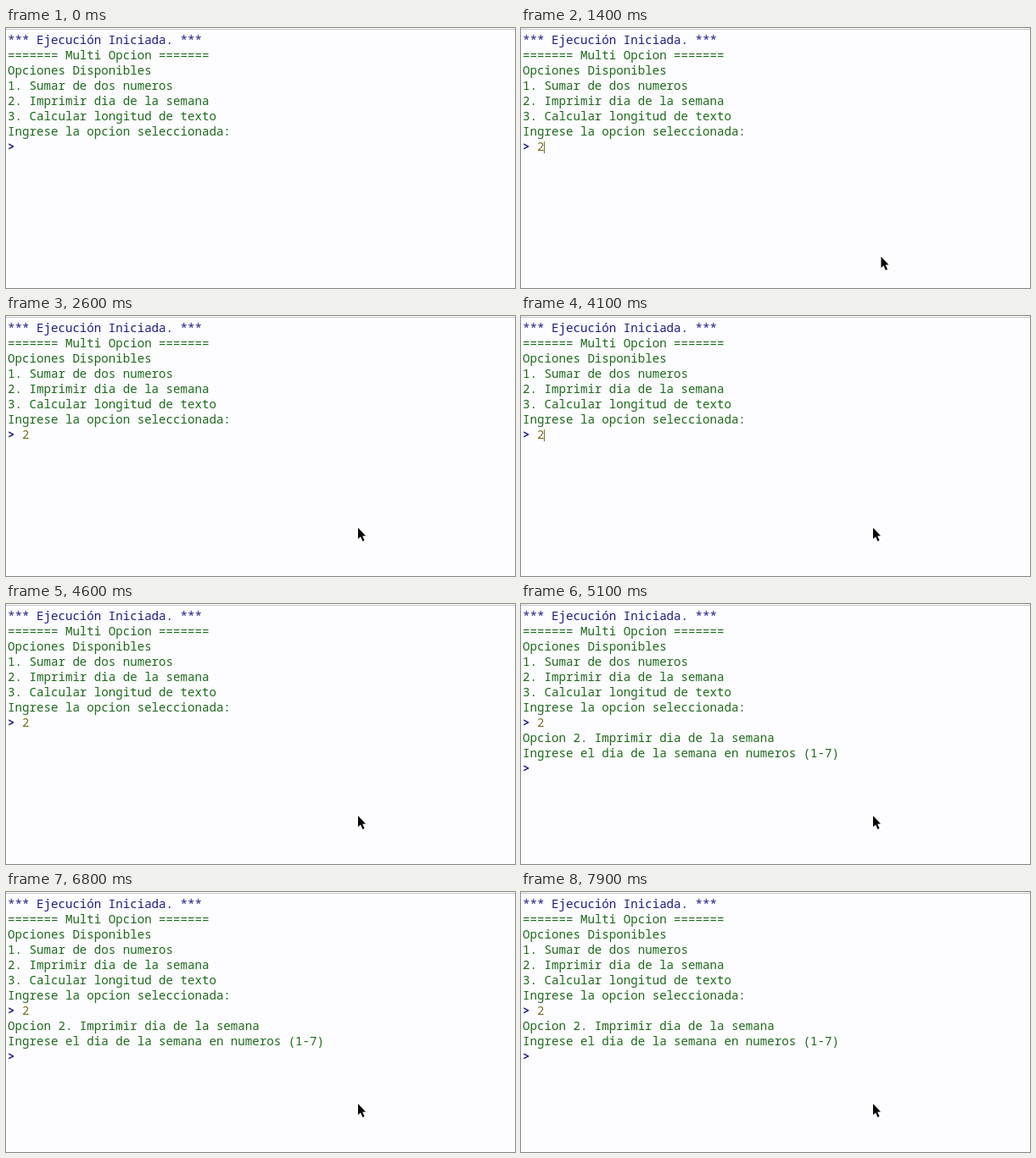
Recreate the animation shown at these times as an HTML page with a canvas. Size 600x307 px, loop 8 s.

```html
<!DOCTYPE html>
<html lang="es">
<head>
<meta charset="utf-8">
<title>Multi Opcion</title>
<style>
  html, body { margin: 0; width: 100%; height: 100%; overflow: hidden; background: #fdfcfe; }
  canvas { display: block; }
</style>
</head>
<body>
<canvas id="stage" width="600" height="307"></canvas>
<script>
const ctx = document.getElementById('stage').getContext('2d');
const LOOP = 8000, STEP = 100, BLINK = 500;
const LEFT = 2.1, CELL = 8.48, BASE = 19, LINE = 18;
const BLUE = '#1c1c86', GREEN = '#1c6a1a', OLIVE = '#74741c';
const FONT = CELL / 0.6 + 'px "Noto Sans Mono", "DejaVu Sans Mono", monospace';

// Moments of the session, in ms
const FOCUS = 400, TYPED = 1100, ENTERED = 4700, PROMPT = 5300;

const menu = [
  '======= Multi Opcion =======',
  'Opciones Disponibles',
  '1. Sumar de dos numeros',
  '2. Imprimir dia de la semana',
  '3. Calcular longitud de texto',
  'Ingrese la opcion seleccionada:'
];
const answer = [
  'Opcion 2. Imprimir dia de la semana',
  'Ingrese el dia de la semana en numeros (1-7)'
];

const pointer = { start: 1300, time: 300, from: [441, 305], to: [415, 250] };
const arrow = [[0, 0], [0, 13.2], [3, 10.5], [5.4, 16], [7.6, 15], [5.2, 9.7], [9, 9.5]];

function write(text, row, color, col = 0, weight = '') {
  ctx.font = weight + ' ' + FONT;
  ctx.fillStyle = color;
  ctx.fillText(text, LEFT + col * CELL, BASE + row * LINE);
}

function drawPrompt(row) {
  write('>', row, BLUE, 0, '600');
}

// The blink starts anew with each input
function drawCaret(t) {
  const begin = t >= ENTERED ? PROMPT : t >= TYPED ? TYPED : FOCUS;
  const since = t - begin;
  if (since < 0 || since % (2 * BLINK) >= BLINK) return;
  const row = t >= ENTERED ? 10 : 7;
  const col = begin === TYPED ? 3 : 2;
  ctx.fillStyle = begin === TYPED ? '#77773a' : '#55557a';
  ctx.fillRect(Math.round(LEFT + col * CELL - 0.2), row * LINE + 8, 1, 14);
}

function drawPointer(t) {
  if (t < pointer.start) return;
  const p = Math.min(1, (t - pointer.start) / pointer.time);
  const left = (1 - p) ** 2.5;
  const [x, y] = pointer.to.map((end, i) => end + (pointer.from[i] - end) * left);
  ctx.beginPath();
  for (const [dx, dy] of arrow) ctx.lineTo(x + dx, y + dy);
  ctx.closePath();
  ctx.lineJoin = 'round';
  ctx.lineWidth = 1.6;
  ctx.strokeStyle = '#fff';
  ctx.stroke();
  ctx.fillStyle = '#080808';
  ctx.fill();
}

function draw(t) {
  ctx.fillStyle = '#fdfcfe';
  ctx.fillRect(0, 0, 600, 307);
  ctx.fillStyle = '#c6c5c9';
  ctx.fillRect(0, 1, 600, 1);

  write('*** Ejecución Iniciada. ***', 0, BLUE);
  menu.forEach((text, i) => write(text, i + 1, GREEN));
  drawPrompt(7);
  if (t >= TYPED) write('2', 7, OLIVE, 2);
  if (t >= ENTERED) {
    answer.forEach((text, i) => write(text, i + 8, GREEN));
    drawPrompt(10);
  }
  drawCaret(t);
  drawPointer(t);
}

const start = performance.now();
function tick(now) {
  const t = Math.max(0, now - start) % LOOP;
  draw(Math.floor(t / STEP) * STEP);
  requestAnimationFrame(tick);
}
draw(0);
requestAnimationFrame(tick);
</script>
</body>
</html>
```
